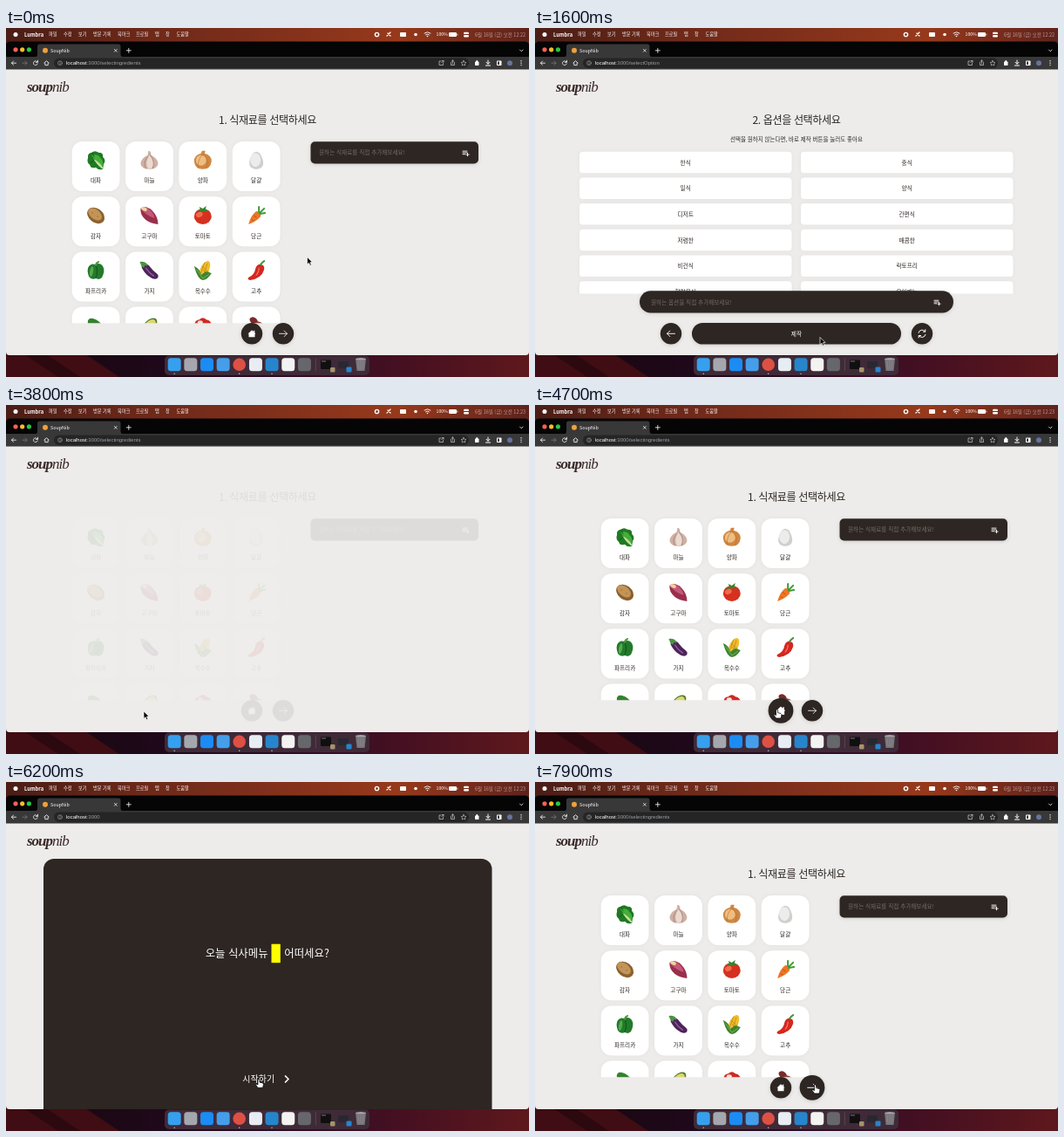
Recreate the animation shown at these times as an HTML page. Size 600 px wide and 400 px high, loop 8000 ms.

```html
<!DOCTYPE html>
<html lang="ko">
<head>
<meta charset="utf-8">
<style>
html, body { margin: 0; width: 100%; height: 100%; overflow: hidden; background: #000; }
svg { display: block; width: 600px; height: 400px; }
text { font-family: "Noto Sans CJK KR", "Noto Sans CJK", sans-serif; fill: #2d2622; }
.mid { text-anchor: middle; }
.title { font-size: 12.1px; letter-spacing: -.4px; }
.light { fill: #fff; }
.hint { fill: #746b66; font-size: 6.6px; }
.bar { font-size: 5.2px; fill: #fff; }
.url { font: 6px "Liberation Sans", Arial, sans-serif; fill: #9aa0a6; }
.logo { font: italic 17px "Liberation Serif", "Times New Roman", serif; letter-spacing: -1px; fill: #3a2a29; }
.line { fill: none; stroke: #fff; stroke-linecap: round; stroke-linejoin: round; }
.card { filter: drop-shadow(0 0 2px #0000000c); }
.dark { filter: drop-shadow(0 1px 2px #0002); }
</style>
</head>
<body>
<svg id="stage" viewBox="0 0 600 400"></svg>
<script>
const INK = '#2d2622', LOOP = 8000;
const rect = (x, y, w, h, fill, r = 0) =>
  `<rect x="${x}" y="${y}" width="${w}" height="${h}" rx="${r}" fill="${fill}"/>`;
const dot = (x, y, r, fill) => `<circle cx="${x}" cy="${y}" r="${r}" fill="${fill}"/>`;
const oval = (rx, ry, fill, turn = 0, x = 0, y = 0) =>
  `<ellipse rx="${rx}" ry="${ry}" fill="${fill}" transform="translate(${x} ${y}) rotate(${turn})"/>`;
const path = (d, fill) => `<path d="${d}" fill="${fill}"/>`;
const line = (d, width = 1, color = '#fff') =>
  `<path class="line" d="${d}" style="stroke:${color};stroke-width:${width}"/>`;
const text = (x, y, s, size, cls = '') =>
  `<text x="${x}" y="${y}" class="${cls}" style="font-size:${size}px">${s}</text>`;
const title = s => `<text x="300" y="109.7" class="mid title">${s}</text>`;
const put = (x, y, body, id = '') => `<g transform="translate(${x} ${y})"><g id="${id}">${body}</g></g>`;

// Vegetables, each drawn around its own centre
const foods = [
  path('M8 10Q3 12 0 8Q-6 10 -7 5Q-11 2 -9 -3Q-10 -8 -5 -9Q-1 -12 3 -9Q9 -9 8 -4Q12 0 9 4Z', '#1f7a22') +
    path('M8 7Q2 5 -5 -6Q3 -8 5 -3Q9 0 8 7Z', '#46ad3a') +
    path('M9 10Q4 9 -3 -2Q6 3 9 10Z', '#c3e0a0') + line('M-6 3Q-3 1-2-1M-4-8Q-3-5-2-4', .8, '#0e5316'),
  path('M-1-11Q2-11 2-6Q10-2 10 4Q9 10 0 10Q-9 10 -10 4Q-10-2 -2-6Z', '#cfb0a4') +
    path('M0-6Q-6 3 -1 10Q5 9 5 3Q4-2 0-6Z', '#eadad0') + line('M1-6Q7 1 4 9M-2-4Q-8 3 -4 9', .7, '#9c776d'),
  path('M-1-11L3-11 2-8Q10-6 10 1Q9 10 0 10Q-9 10 -10 1Q-10-6 -2-8Z', '#cf8742') +
    oval(6, 6, '#eebd80', 0, -2, 0) + line('M1-7Q8 0 4 9M0-7Q-7 0 -5 8', .6, '#b97034'),
  path('M0-10C5-10 8-1 8 3C8 8 4 10 0 10C-4 10-8 8-8 3C-8-1-5-10 0-10Z', '#cfcfce') +
    oval(6, 8, '#ececeb', 0, -1, -.5),
  oval(11, 8, '#8b602f', 38) + oval(9, 5.5, '#c29457', 38, -1, -1.5) +
    dot(-4, -3, .6, '#8b602f') + dot(2, 1, .6, '#8b602f'),
  path('M-10-8Q-4-12 3-6Q10 1 10 10Q1 9 -4 5Q-11 -1 -10-8Z', '#9a2f4c') +
    path('M-10-8Q-6-12 -1-8Q6-2 6 3Q0 1 -4-2Q-8-5 -10-8Z', '#c4587a') + oval(3.5, 2, '#eed49a', 25, -6, -7.5),
  oval(10, 9, '#d6301f', 0, 0, 1) + oval(4, 3, '#ef6a4c', -25, -4, -1) +
    path('M0-5L-7-4-3-7-4-10 0-8 4-11 3-7 7-5Z', '#37822f'),
  path('M-9 10Q-6-1 0-5Q6-5 5 1Q0 7 -9 10Z', '#ed7524') + line('M-3 0L0 2M-5 5L-3 6', .8, '#b94f16') +
    line('M3-4L3-10M4-3L9-8M4-2L10-3', 2, '#3c9a36'),
  path('M-1-7Q5-10 8-5Q11 0 7 8Q4 11 0 9Q-5 11 -8 7Q-11-1 -8-5Q-5-9 -1-7Z', '#237a2b') +
    oval(2, 6, '#57a94f', 10, -5, 1) + line('M0-6Q3 1 0 8', 1, '#0f501c') + line('M0-6Q0-9 3-10', 2, '#4e963e'),
  path('M-7-7Q-2-9 1-4Q4 0 8 3Q12 6 9 9Q5 11 0 7Q-6 3 -9-4Z', '#4d2359') + line('M-4-3Q0 3 5 6', 1.3, '#90609c') +
    path('M-11-10Q-6-11 -3-8L-2-5-5-6-6-3-9-5Z', '#4b9442'),
  oval(5, 11, '#efbd2b', 25, 2, -1) + line('M2-9L-3 5M5-8L1 5M-1-5L7 2M0-1L5 4', .7, '#b88117') +
    path('M-10-5Q-4-3 -2 5L4 1 10 3Q6 10 0 11Q-6 10 -10-5Z', '#3d8431') + line('M-7-1Q-3 4 0 9L7 4', .8, '#85bd59'),
  path('M3-7Q10-8 9-1Q6 9 -7 11Q-11 10 -9 8Q-2 5 -1-2Q0-6 3-7Z', '#d5261f') + line('M3-3Q3 2 0 5', 1.2, '#f37869') +
    line('M5-7Q6-9 9-11', 2.2, '#4b943c'),
  oval(11, 6, '#34812e', 40) + oval(5, 4, '#a5cf70', 40, 5, 4),
  oval(6, 11, '#4d7c2c', 45) + oval(5, 9, '#dbd76e', 45) + dot(-2, 3, 3.5, '#7a4826'),
  path('M-10 0Q-9-7 -4-7Q0-11 4-7Q10-6 10 0V9H-10Z', '#cf2922') + oval(3, 2, '#f0e3d8', 0, -3, -4),
  oval(5, 3.5, '#782d2b', 30, -3, -6) + oval(6, 4, '#934038', 40, 4, 0)
];
const foodNames = '대파 마늘 양파 달걀 감자 고구마 토마토 당근 파프리카 가지 옥수수 고추'.split(' ');
const options = '한식 중식 일식 양식 디저트 간편식 저렴한 매콤한 비건식 락토프리 할랄음식 유아메뉴'.split(' ');

const foodCards = foods.map((art, i) => {
  const x = 75.7 + i % 4 * 61.35, y = 130 + (i >> 2) * 63.2;
  return rect(x, y, 54.8, 57, '#fff', 12) + put(x + 27.4, y + 21.7, art) +
    text(x + 27.4, y + 47.3, foodNames[i] || '', 6.6, 'mid');
}).join('');
const optionCards = options.map((s, i) => {
  const x = i % 2 ? 305 : 51, y = 141.7 + (i >> 1) * 29.7;
  return rect(x, y, 243.5, 24.5, '#fff', 4) + text(x + 121.7, y + 14.8, s, 6.7, 'mid');
}).join('');

const addIcon = line('M-3.5-2H1.5M-3.5-.2H1.5M-3.5 1.6H-.8M2 .3V3.7M.3 2H3.7', .9);
const field = (x, y, w, r, hint) => `<g class="dark">${rect(x, y, w, 25.2, INK, r)}</g>` +
  `<text class="hint" x="${x + (r > 6 ? 13 : 9.5)}" y="${y + 15.2}">${hint}</text>` +
  put(x + w - (r > 6 ? 18.5 : 14.5), y + 12.9, addIcon);
const round = (x, icon, id) => put(x, 350.3, `<g class="dark">${dot(0, 0, 12.2, INK)}</g>` + icon, id);

const foodPage =
  title('1. 식재료를 선택하세요') +
  `<g clip-path="url(#foodClip)"><g class="card">${foodCards}</g></g>` +
  field(349.5, 130.2, 192.5, 5, '원하는 식재료를 직접 추가해보세요!') +
  round(282, path('M-4.5 .2L0-4 2-2.2V-3.5H3.3V-1L4.5 .2H3.5V4H-3.5V.2Z', '#fff'), 'homeBtn') +
  round(318, line('M-4.5 0H4.5M1.2-3.3L4.5 0 1.2 3.3', .8), 'nextBtn');

const optionPage =
  title('2. 옵션을 선택하세요') +
  text(300, 129.5, '선택을 원하지 않는다면, 바로 제작 버튼을 눌러도 좋아요', 6.5, 'mid') +
  `<g clip-path="url(#optionClip)"><g class="card">${optionCards}</g></g>` +
  field(120, 301.3, 360, 12.5, '원하는 옵션을 직접 추가해보세요!') +
  round(156, line('M4.5 0H-4.5M-1.2-3.3L-4.5 0-1.2 3.3', .9), 'backBtn') +
  put(300, 350.3, `<g class="dark">${rect(-120, -12.3, 240, 24.6, INK, 12.3)}</g>`, 'makeBtn') +
  text(300, 352.8, '제작', 6.7, 'mid light') +
  round(444, line('M-4-1A4.2 4.2 0 0 1 3.5-2.4M4 1A4.2 4.2 0 0 1-3.5 2.4M3.8-4.6V-2.2H1.4M-3.8 4.6V2.2H-1.4', 1), '');

const homePage =
  rect(43, 88, 514.5, 320, INK, 12) +
  text(228.7, 201, '오늘 식사메뉴', 12.4, 'light') + rect(304.5, 185.7, 10.3, 21.5, '#ff0') +
  text(319.3, 201, '어떠세요?', 12.4, 'light') +
  text(271.3, 344, '시작하기', 10, 'light') + line('M320.5 337L324 340.5 320.5 344', 1.7);

const menus = [[49, '파일'], [66, '수정'], [83, '보기'], [100, '방문 기록'], [128, '북마크'],
  [149, '프로필'], [171, '탭'], [183, '창'], [195.5, '도움말']];
const menuBar =
  rect(0, 0, 600, 20, 'url(#sky)') + dot(11, 7.5, 2.5, '#fff') +
  text(21, 9.6, '<tspan font-weight="700">Lumbra</tspan>', 5.8, 'light') +
  menus.map(([x, s]) => `<text class="bar" x="${x}" y="9.4">${s}</text>`).join('') +
  dot(425.5, 7.5, 2.8, '#fff') + rect(424.3, 6.3, 2.4, 2.4, '#70291c', .5) +
  line('M437 9L441 5M438 6L441 9', 1.3) + rect(452, 5, 7, 5, '#fff', .8) + dot(470, 7.5, 1.8, '#fff') +
  line('M480 6Q483.5 3.3 487 6M481.5 7.8Q483.5 6.2 485.5 7.8', .9) + dot(483.5, 9.5, .8, '#fff') +
  '<text class="bar" x="493.5" y="9.4">100%</text>' + rect(508, 5, 9, 5, '#fff', 1.3) + rect(517.5, 6.6, .8, 1.8, '#fff') +
  rect(525, 4.7, 6, 2.4, '#fff', 1.2) + rect(525, 8, 6, 2.4, '#fff', 1.2) +
  '<text id="clock" class="bar" x="538" y="9.5" style="font-size:5.5px;opacity:.55"></text>';

const browser =
  path('M0 47V20Q0 15.5 5 15.5H595Q600 15.5 600 20V47Z', '#050505') +
  path('M34 33Q36 33 36 30V21Q36 18.5 39 18.5H129Q131.5 18.5 131.5 21V30Q131.5 33 134 33Z', '#383838') +
  rect(0, 33, 600, 14.5, '#383838') +
  dot(11, 24.8, 2.6, '#ff5f57') + dot(18.7, 24.8, 2.6, '#febc2e') + dot(26.4, 24.8, 2.6, '#28c840') +
  dot(45, 25.8, 3, '#f0a03a') + text(51, 27.8, 'SoupNib', 5.4, 'light') +
  line('M124.3 24.3L127.3 27.3M127.3 24.3L124.3 27.3', .7) + line('M138.3 25.8H143.3M140.8 23.3V28.3', .8) +
  line('M589.5 25L591.3 26.8 593 25', .8) +
  line('M11.5 40.2H6.5M8.5 38L6.5 40.2 8.5 42.4', .8) + line('M19 40.2H24M22 38L24 40.2 22 42.4', .8, '#77787c') +
  line('M36 39A2.4 2.4 0 1 0 36.2 41M36.5 37.2V39.3H34.4', .8) + line('M43.8 40L46.5 37.7 49.2 40M44.8 40V42.6H48.2V40', .8) +
  rect(55, 34.6, 476, 11.3, '#252525', 5.6) + line('M62 39.7V41.5M62 38.5V38.5', .6, '#aaa') +
  '<circle class="line" cx="62" cy="40.2" r="2.4" style="stroke:#aaa;stroke-width:.6"/>' +
  '<text class="url" x="69" y="42.2"><tspan fill="#fff">localhost</tspan>:3000<tspan id="route"></tspan></text>' +
  line('M499 38H497V42.5H501.5V40.5M499.5 40L502 37.5M500.3 37.5H502V39.3', .7, '#ccc') +
  line('M510.5 39.5V42.5H514.5V39.5M512.5 41V37M511 38.3L512.5 37 514 38.3', .7, '#ccc') +
  line('M525 37.3L525.9 39.3 528 39.5 526.4 41 526.8 43 525 42 523.2 43 523.6 41 522 39.5 524.1 39.3Z', .6, '#ccc') +
  rect(538, 38.5, 4.5, 4.5, '#fff', .8) + dot(540.3, 38.2, 1.1, '#fff') +
  line('M553 37V41M551 39.3L553 41.3 555 39.3M550.5 43H555.5', 1) +
  rect(563, 37.5, 5.5, 5.5, '#fff', .8) + rect(564, 38.5, 2, 3.5, '#383838') +
  dot(578, 40.2, 3, '#6673a0') + [37.8, 40.2, 42.6].map(y => dot(591, y, .7, '#fff')).join('');

const dockColors = ['#36a0ee', '#a5a7ae', '#1b8cf3', '#459eea', '#dd5144', '#e7edf2', '#2785cc', '#f3f3f2', '#66676b'];
const dock =
  rect(0, 370, 600, 30, 'url(#ground)') +
  path('M0 370H85L130 400H0Z', '#3f0d13') + path('M15 370H40L85 400H60Z', '#2c080f') +
  rect(182, 375.5, 235, 22.5, '#3f2a38', 5) +
  dockColors.map((c, i) => i == 4 ? dot(267.7, 385.8, 7.3, c) : rect(185.7 + i * 18.65, 378.3, 15, 15, c, 3.5)).join('') +
  [193.2, 267.7, 305].map(x => dot(x, 396.2, .7, '#ccc')).join('') +
  line('M355.3 379V393', .5, '#75636d') + rect(361, 380.5, 12, 10.5, '#101010', 1) +
  rect(362, 381.5, 5, 1, '#777') + rect(372, 389, 5.5, 5.5, '#a6946a', 1) +
  rect(381, 382, 12, 8, '#292832', 1) + rect(390.5, 388.5, 6, 6, '#2785cc', 1) +
  path('M401 379H413L411.5 393H402.5Z', '#77757a') + oval(6, 1.3, '#a5a3a6', 0, 407, 379.3) +
  line('M404 382L405 391M407 382V391M410 382L409 391', .5, '#96949a');

const gradient = (id, ...stops) => `<linearGradient id="${id}">` +
  stops.map((c, i) => `<stop offset="${i / (stops.length - 1)}" stop-color="${c}"/>`).join('') + '</linearGradient>';
const clip = (id, y, h) => `<clipPath id="${id}">${rect(0, y, 600, h, '#000')}</clipPath>`;

const stage = document.getElementById('stage');
stage.innerHTML = '<defs>' +
  gradient('sky', '#4a1d16', '#6b2819', '#80301b', '#97391b', '#5e221c') +
  gradient('ground', '#1a070d', '#1d0818', '#2a0b24', '#451022', '#5e181c') +
  clip('foodClip', 125, 213.3) + clip('optionClip', 137, 167.5) + clip('windowClip', 47, 328) + '</defs>' +
  menuBar + dock + path('M0 47H600V371Q600 375 596 375H4Q0 375 0 371Z', '#edecea') + browser +
  '<text class="logo" x="24" y="73"><tspan font-weight="700">soup</tspan>nib</text>' +
  `<g clip-path="url(#windowClip)"><g id="food">${foodPage}</g><g id="option">${optionPage}</g><g id="home">${homePage}</g></g>` +
  '<g id="cursor">' +
  '<path id="arrow" d="M0 0V8.5L2 6.7 3.3 9.7 4.8 9 3.5 6.1H6.1Z" fill="#000" stroke="#fff" stroke-width=".7"/>' +
  '<path id="hand" d="M-1 0Q0-1 1 0V3.2L4.5 4Q5.8 4.5 5.3 6.5L4.5 9.5H-1L-3.6 5.8Q-3.5 4.5 -1 6Z" fill="#fff" stroke="#000" stroke-width=".7"/></g>';

const el = id => document.getElementById(id);
const clamp = v => Math.max(0, Math.min(1, v));
const ramp = (t, from, to) => { const p = clamp((t - from) / (to - from)); return p * p * (3 - 2 * p); };
const mix = (a, b, p) => a + (b - a) * p;

// time, x, y of the pointer tip
const moves = [[0, 345.5, 262.5], [200, 345, 264], [800, 320, 350], [1200, 321, 351], [1600, 327, 354.5],
  [2750, 327, 354.5], [3100, 165.5, 354.5], [3350, 158, 351], [3800, 158, 351], [4400, 277.5, 349.5],
  [4900, 277.5, 349.5], [5200, 276.3, 349.5], [5500, 276.3, 349.5], [5900, 290, 341], [6500, 290, 341],
  [6900, 313.7, 341.5], [7200, 314, 342], [7700, 321.5, 347.5], [8000, 321.5, 347.5]];
const hands = [[680, 1250], [1680, 3560], [4250, 4900], [5700, 6550], [7350, 8000]];

function pointer(t) {
  const i = moves.findIndex(m => m[0] > t), a = moves[i - 1], b = moves[i], p = ramp(t, a[0], b[0]);
  return [mix(a[1], b[1], p), mix(a[2], b[2], p)];
}
const scale = (id, x, y = x) => el(id).setAttribute('transform', `scale(${x} ${y})`);
function show(id, opacity) {
  el(id).style.display = opacity > 0 ? '' : 'none';
  el(id).style.opacity = opacity;
}

function draw(t) {
  const page = t < 1250 ? 'food' : t < 3550 ? 'option' : t < 4880 ? 'food' : t < 6550 ? 'home' : 'food';
  const shown = t < 1250 ? 1 : t < 3550 ? ramp(t, 1300, 1550) : t < 4880 ? ramp(t, 3750, 4050) :
    t < 6550 ? 1 : ramp(t, 6920, 7200);
  for (const id of ['food', 'option', 'home']) show(id, id == page ? shown : 0);
  el('route').textContent = { food: '/selectingredients', option: '/selectOption', home: '' }[page];
  el('clock').textContent = '6월 16일 (금) 오전 12:' + (t < 2300 ? 22 : 23);

  const slide = -600 * (1 - clamp((t - 4950) / 784)) ** 3;
  el('home').setAttribute('transform', `translate(${slide} 0)`);
  scale('nextBtn', 1 + .18 * (t < 1250 ? ramp(t, 680, 880) : ramp(t, 7350, 7550)));
  scale('homeBtn', 1 + .18 * ramp(t, 4280, 4480) * (t < 4880));
  scale('backBtn', 1 + .18 * ramp(t, 3100, 3300));
  scale('makeBtn', 1 + .033 * ramp(t, 1650, 1850) * (1 - ramp(t, 3100, 3250)), 1);

  const [x, y] = pointer(t), hand = hands.some(([a, b]) => t >= a && t < b);
  el('cursor').setAttribute('transform', `translate(${x} ${y})`);
  show('hand', +hand);
  show('arrow', +!hand);
}

const start = performance.now();
function tick() {
  draw((performance.now() - start) % LOOP);
  requestAnimationFrame(tick);
}
tick();
</script>
</body>
</html>
```
